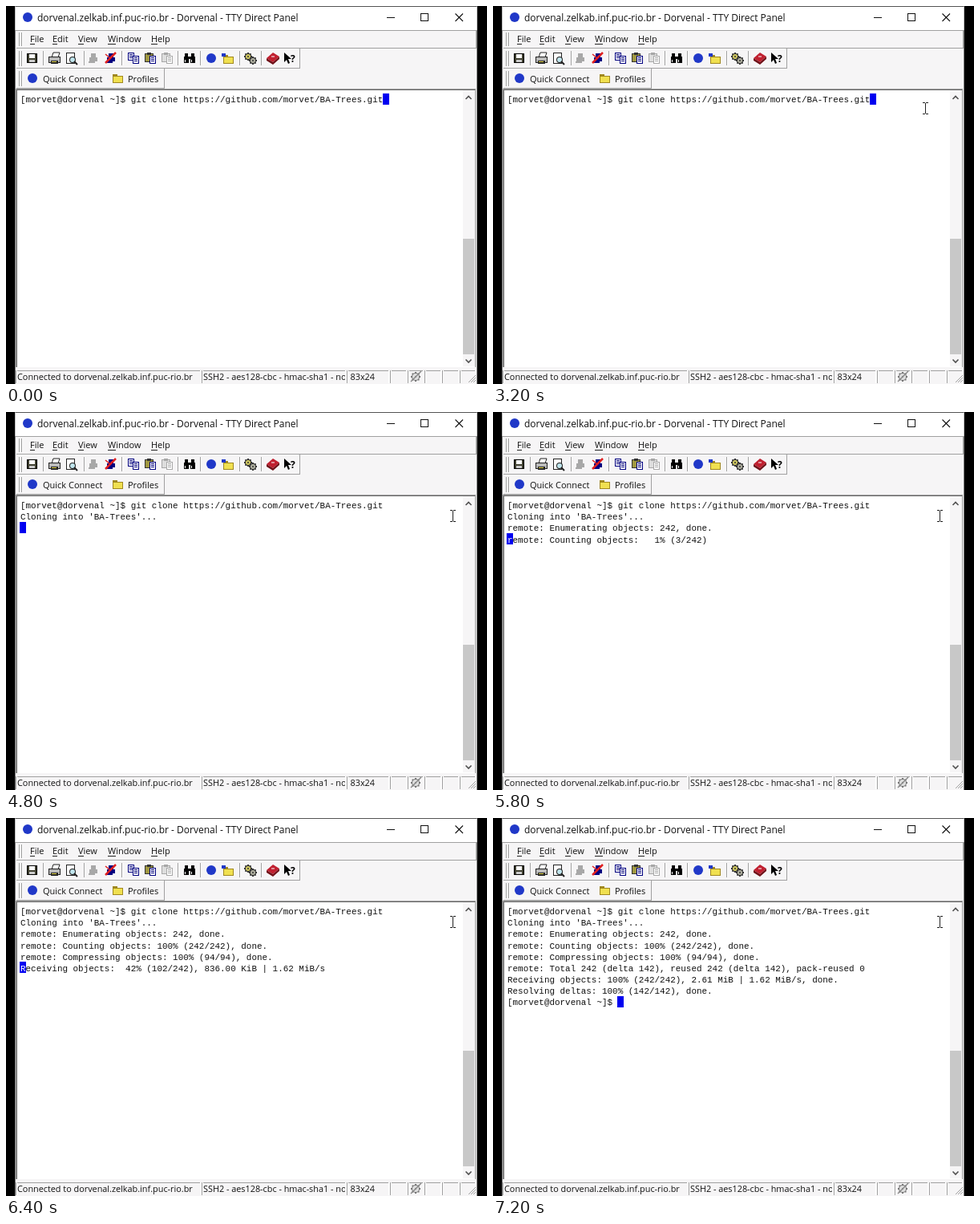
Recreate the animation shown at these times as an HTML page with a canvas. Size 600 px wide and 471 px high, loop 8 s.

```html
<!DOCTYPE html>
<html lang="en">
<head>
<meta charset="utf-8">
<title>Terminal clone</title>
<style>
html, body { margin: 0; width: 100%; height: 100%; overflow: hidden; background: #000; }
canvas { display: block; width: 600px; height: 471px; }
</style>
</head>
<body>
<canvas id="stage" width="600" height="471"></canvas>
<script>
const ctx = document.getElementById('stage').getContext('2d');
const LOOP = 8000;
const UI = '"Open Sans", "Noto Sans", sans-serif';
const MONO = '"Liberation Mono", "Courier New", monospace';
const CELL = 6.565, ROW = 14.07, LEFT = 17, TOP = 109;
const NAVY = '#000080', BLUE = '#2038c8', GRAY = '#a8a8a8', YELLOW = '#f0e050';
const FACE = '#f6f5f6', EDGE = '#a0a0a0';

const USER = 'morvet', HOST = 'dorvenal';
const DOMAIN = `${HOST}.zelkab.inf.puc-rio.br`;
const PROMPT = `[${USER}@${HOST} ~]$ `;
const CLONE = `${PROMPT}git clone https://github.com/${USER}/BA-Trees.git`;

const started = [CLONE, "Cloning into 'BA-Trees'..."];
const listed = [...started, 'remote: Enumerating objects: 242, done.'];
const counted = [...listed, 'remote: Counting objects: 100% (242/242), done.'];
const packed = [...counted, 'remote: Compressing objects: 100% (94/94), done.'];
const finished = [...packed,
  'remote: Total 242 (delta 142), reused 242 (delta 142), pack-reused 0',
  'Receiving objects: 100% (242/242), 2.61 MiB | 1.62 MiB/s, done.',
  'Resolving deltas: 100% (142/142), done.',
  PROMPT];

// Each screen: start time, lines, cursor column on the last line
const screens = [
  [0, [CLONE], CLONE.length],
  [4800, [...started, ''], 0],
  [5800, [...listed, 'remote: Counting objects:   1% (3/242)'], 0],
  [6000, [...counted, 'remote: Compressing objects:   1% (1/94)'], 0],
  [6200, [...packed, 'Receiving objects:   1% (3/242)'], 0],
  [6400, [...packed, 'Receiving objects:  42% (102/242), 836.00 KiB | 1.62 MiB/s'], 0],
  [6600, finished, PROMPT.length]
];

const pointer = [[3200, 539, 128], [3600, 563, 131], [3800, 557, 130]];

const latest = (list, t) => list.filter(step => step[0] <= t).pop();

function box(x, y, w, h, color) {
  ctx.fillStyle = color;
  ctx.fillRect(x, y, w, h);
}

function frame(x, y, w, h, fill, stroke = '#000') {
  box(x, y, w, h, stroke);
  box(x + 1, y + 1, w - 2, h - 2, fill);
}

function disc(x, y, r, color) {
  ctx.fillStyle = color;
  ctx.beginPath();
  ctx.arc(x, y, r, 0, Math.PI * 2);
  ctx.fill();
}

function path(points, color, width = 1, filled = false) {
  ctx.beginPath();
  for (let i = 0; i < points.length; i += 2) ctx.lineTo(points[i], points[i + 1]);
  if (filled) {
    ctx.fillStyle = color;
    ctx.fill();
  } else {
    ctx.strokeStyle = color;
    ctx.lineWidth = width;
    ctx.stroke();
  }
}

function label(str, x, y, size = 11, color = '#111', family = UI) {
  ctx.font = `${size}px ${family}`;
  ctx.fillStyle = color;
  ctx.fillText(str, x, y);
}

function groove(x, y, h) {
  box(x, y, 1, h, EDGE);
  box(x + 1, y, 1, h, '#fff');
}

function bar(y, w, h) {
  box(13, y, w, 1, '#fff');
  box(13, y + h, w, 1, EDGE);
  box(13 + w, y, 1, h + 1, EDGE);
  groove(16, y + 3, h - 5);
  groove(19, y + 3, h - 5);
}

function folder(x, y) {
  box(x, y, 6, 3, '#a08820');
  frame(x, y + 2, 13, 9, YELLOW, '#a08820');
}

function page(x, y, ink) {
  frame(x, y, 8, 10, '#fff', ink);
  for (let i = 0; i < 3; i++) box(x + 2, y + 2 + i * 2, 4, 1, ink);
}

function clipboard(x, y, ink, fill) {
  frame(x, y + 1, 11, 11, fill, ink);
  box(x + 3, y, 5, 3, ink);
  page(x + 6, y + 4, ink === GRAY ? GRAY : NAVY);
}

function plug(x, y, color) {
  box(x + 3, y, 6, 9, color);
  box(x + 1, y + 5, 10, 5, color);
  box(x, y + 10, 8, 2, color);
}

function gear(x, y, r, color, ink = '#333') {
  for (let i = 0; i < 8; i++) {
    const a = i * Math.PI / 4;
    box(x + Math.cos(a) * r - 1, y + Math.sin(a) * r - 1, 2, 2, ink);
  }
  disc(x, y, r, ink);
  disc(x, y, r - 1, color);
  disc(x, y, 1, ink);
}

function titleBar() {
  box(11.5, 0, 576, 30, '#fff');
  box(11.5, 0, 576, 1, '#555');
  disc(27, 14, 6, BLUE);
  label(`${DOMAIN} - Dorvenal - TTY Direct Panel`, 39, 19.3, 12);
  box(475, 14, 10, 1, '#111');
  frame(517, 9, 10, 10, '#fff', '#111');
  path([560.5, 9.5, 570, 19], '#111', 1.1);
  path([570, 9.5, 560.5, 19], '#111', 1.1);
}

function menus() {
  bar(30, 573, 22);
  box(12, 30, 575, 1, EDGE);
  const items = [['File', 30, 6], ['Edit', 58, 6], ['View', 90, 7], ['Window', 127, 10], ['Help', 181, 8]];
  for (const [name, x, w] of items) {
    label(name, x, 45);
    box(x, 47, w, 1, '#222');
  }
}

function toolbar() {
  bar(53, 353, 24);
  for (const x of [46, 97, 144, 214, 242, 291, 318]) groove(x, 56, 18);

  frame(26, 59, 13, 12, '#404030');
  box(29, 60, 7, 5, '#fff');
  box(29, 67, 7, 3, '#ccc');

  path([57, 64, 59, 58, 67, 58, 65, 64], '#fff', 1, true);
  path([57, 64, 59, 58, 67, 58, 65, 64], '#222');
  frame(53, 63, 15, 8, '#bbb', '#222');
  box(56, 68, 9, 4, '#222');
  box(57, 69, 6, 1, YELLOW);

  frame(75, 58, 11, 14, '#fff', '#222');
  disc(83, 67, 4, '#222');
  disc(83, 67, 3, '#bfe4ec');
  path([85, 69, 89, 73], '#222', 2);

  plug(103, 59, GRAY);
  plug(125, 59, NAVY);
  path([124, 71, 137, 58], '#e02020', 2.5);
  path([124, 60, 130, 65], '#e02020', 1.5);

  page(152, 58, NAVY);
  page(158, 62, NAVY);
  clipboard(173, 58, '#333', '#a09840');
  clipboard(194, 58, GRAY, '#ddd');

  for (const x of [222, 230]) {
    box(x + 1, 59, 4, 5, '#000');
    box(x, 63, 6, 8, '#000');
    box(x + 1, 67, 1, 3, '#fff');
  }
  box(227, 63, 4, 3, '#000');

  disc(256, 65, 6, BLUE);
  folder(271, 61);
  box(269, 59, 5, 4, BLUE);

  gear(302, 63, 4, '#d0c860');
  gear(308, 68, 4, '#b0b0a0');

  path([325, 65, 333, 58, 341, 63, 333, 70], '#c02030', 1, true);
  path([325, 65, 333, 70, 341, 63, 341, 66, 333, 73, 325, 68], '#701018', 1, true);
  path([331, 63, 335, 63], '#fff');

  path([347, 58, 347, 70, 350, 67, 352, 72, 354, 71, 352, 66, 356, 66], '#000', 1, true);
  label('?', 355, 70, 'bold 12', '#000');
}

function quickBar() {
  bar(78, 184, 24);
  disc(33, 90, 6, BLUE);
  label('Quick Connect', 46, 95);
  folder(133, 85);
  label('Profiles', 152, 95);
}

function scrollBar() {
  box(570, 105, 15, 344, FACE);
  box(570, 290, 14, 144, '#c8c8c8');
  path([573.5, 116, 577, 112.5, 580.5, 116], '#505050', 1.6);
  path([573.5, 440.5, 577, 444, 580.5, 440.5], '#505050', 1.6);
}

function pane(x, right) {
  box(x, 454, right - x, 1, EDGE);
  groove(x, 454, 16);
  box(right, 454, 1, 16, '#fff');
}

function statusBar() {
  const edges = [12, 244, 425, 479, 501, 522, 544, 566, 587];
  for (let i = 1; i < edges.length; i++) pane(edges[i - 1], edges[i] - 2);
  label(`Connected to ${DOMAIN}`, 14, 466, 10.85);
  ctx.save();
  ctx.beginPath();
  ctx.rect(245, 455, 178, 16);
  ctx.clip();
  label('SSH2 - aes128-cbc - hmac-sha1 - none', 246, 466, 10.85);
  ctx.restore();
  label('83x24', 429.5, 466, 10.85);
  gear(511, 462, 5, '#ddd', '#777');
  path([505, 468, 518, 455], '#888', 1.4);
  for (let i = 0; i < 3; i++) path([577 + i * 3, 469, 586, 460 + i * 3], EDGE);
}

function terminal(t) {
  box(12, 103, 574, 347, EDGE);
  box(13, 104, 572, 346, '#696969');
  box(14, 105, 571, 345, '#fff');
  const [, lines, col] = latest(screens, t);
  const size = CELL / 0.6001;
  const textX = LEFT + 1;
  lines.forEach((line, i) => label(line, textX, TOP + 11.3 + i * ROW, size, '#111', MONO));

  const last = lines.length - 1;
  const y = TOP + last * ROW;
  box(LEFT + Math.round(col * CELL), Math.round(y), 8, 14, '#0000f0');
  const under = lines[last][col];
  if (under) label(under, textX + col * CELL, y + 11.3, size, '#fff', MONO);
}

function iBeam(t) {
  const at = latest(pointer, t);
  if (!at) return;
  const [, x, y] = at;
  box(x, y - 7, 1, 13, '#222');
  for (const edge of [y - 8, y + 6]) {
    box(x - 3, edge, 3, 1, '#222');
    box(x + 1, edge, 3, 1, '#222');
  }
}

function draw(now) {
  const t = now % LOOP;
  box(0, 0, 600, 471, '#000');
  box(11.5, 0, 576, 471, FACE);
  titleBar();
  menus();
  toolbar();
  quickBar();
  terminal(t);
  scrollBar();
  statusBar();
  iBeam(t);
  requestAnimationFrame(draw);
}
requestAnimationFrame(draw);
</script>
</body>
</html>
```
